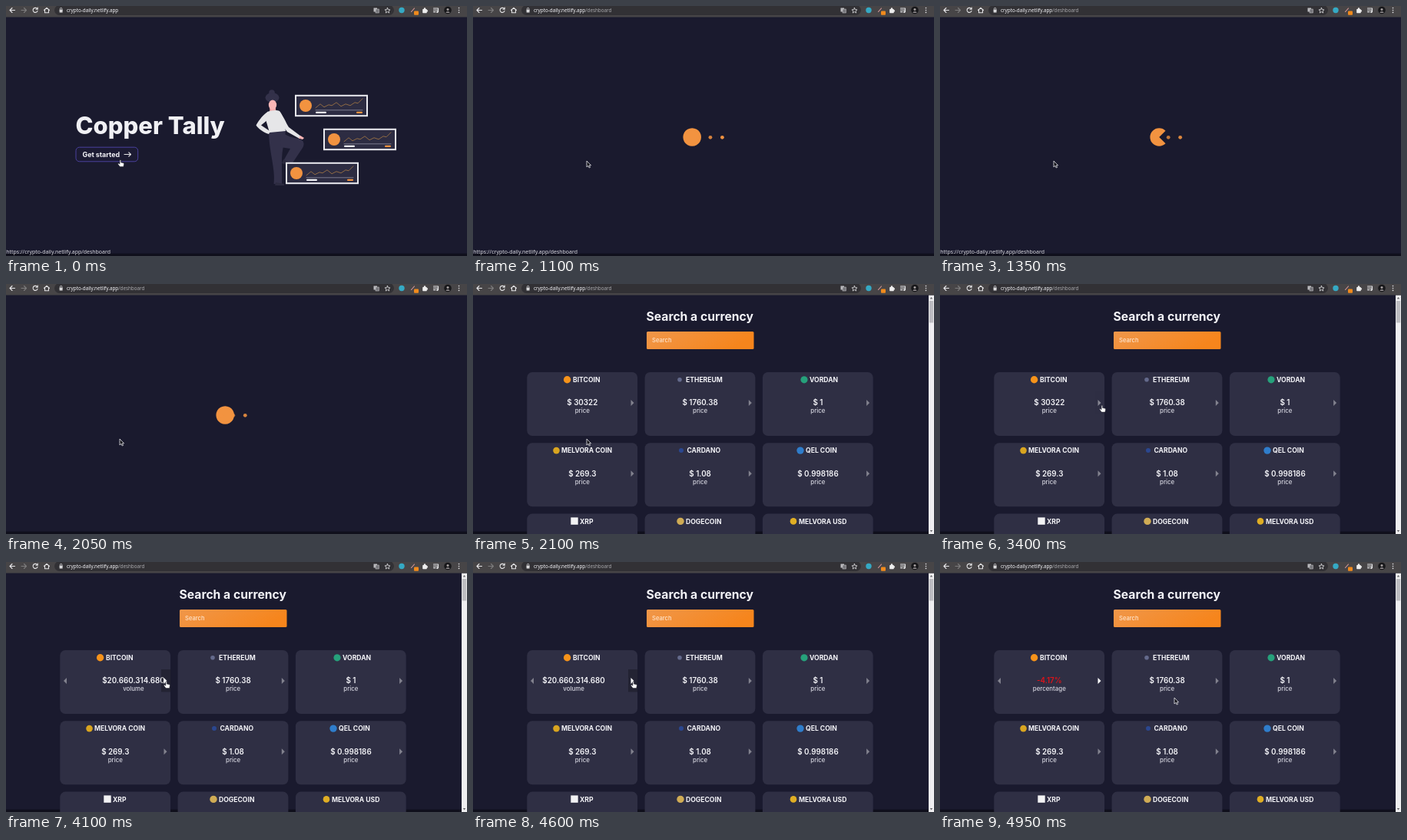
Animation of 600 by 326 pixels, one loop 5 s. Source, as an HTML page:

```html
<!DOCTYPE html>
<html lang="en">
<head>
<meta charset="utf-8">
<title>Currency dashboard</title>
<style>
  html, body { margin: 0; width: 100%; height: 100%; overflow: hidden; background: #1a1a2e; }
  svg { display: block; width: 600px; height: 326px; font-family: Inter, sans-serif; fill: #f4f4f8; }
  .bar { font: 500 6.3px "Noto Sans", sans-serif; }
  .status { font: 6.95px "Noto Sans", sans-serif; fill: #d9d9de; }
  .title { font-size: 31px; font-weight: 800; fill: #f0f0f4; }
  .head { font-size: 15.7px; font-weight: 700; }
  .cta { font-size: 8.9px; font-weight: 700; }
  .name { font-size: 8.6px; font-weight: 700; }
  .value { font-size: 9.8px; font-weight: 600; text-anchor: middle; }
  .label { font-size: 7.9px; font-weight: 500; fill: #d5d5df; text-anchor: middle; }
  .hint { font-size: 7.6px; font-weight: 500; fill: #ffe6cf; }
  .line { fill: none; stroke: #e4e4e6; stroke-width: 1.1; stroke-linecap: round; stroke-linejoin: round; }
</style>
</head>
<body>
<svg id="stage" viewBox="0 0 600 326"></svg>
<script>
const LOOP = 5000, STEP = 50;
const T = {
  load: 1100, statusOff: 1500, ready: 2100,
  hover: 3350, slide1: 3840, slide2: 4540, leave: 4700
};
const ORANGE = '#f29340', CARD = '#2f2f44', DARK = '#33314a', SHIRT = '#e6e6e8', SKIN = '#fbb6b6';
const SLIDE_W = 144, SLIDE_MS = 350;

const rect = (x, y, w, h, fill, extra = '') =>
  `<rect x="${x}" y="${y}" width="${w}" height="${h}" fill="${fill}" ${extra}/>`;
const dot = (x, y, r, fill) => `<circle cx="${x}" cy="${y}" r="${r}" fill="${fill}"/>`;
const oval = (x, y, rx, ry, fill) => `<ellipse cx="${x}" cy="${y}" rx="${rx}" ry="${ry}" fill="${fill}"/>`;
const text = (x, y, cls, str, extra = '') => `<text x="${x}" y="${y}" class="${cls}" ${extra}>${str}</text>`;
const path = (d, fill, extra = '') => `<path d="${d}" fill="${fill}" ${extra}/>`;
const line = (d, extra = '') => `<path d="${d}" class="line" ${extra}/>`;
const group = (id, body, extra = '') => `<g id="${id}" ${extra}>${body}</g>`;

function toolbar() {
  return rect(0, 0, 600, 14.5, '#474547') +
    rect(63, -1, 442, 13, '#323135', 'rx="6.5"') +
    line('M11.5 5.5H5M8 2.5L5 5.5L8 8.5') +
    line('M20 5.5H26.5M23.5 2.5L26.5 5.5L23.5 8.5', 'opacity=".35"') +
    line('M40.7 3.8A3 3 0 1 0 41 6.3M41.2 2V4.2H39') +
    line('M49.5 5.5L53 2.3L56.5 5.5M50.5 5V8.7H55.5V5') +
    rect(69.6, 4.8, 4, 3.6, '#d8d8da', 'rx=".5"') + line('M70.4 4.8V3.6A1.2 1.2 0 0 1 72.8 3.6V4.8', 'style="stroke-width:.8"') +
    text(79, 8, 'bar', 'crypto-daily.netlify.app<tspan id="route" fill="#a9a9ad" font-weight="400">/deshboard</tspan>') +
    rect(478.5, 2.5, 4.5, 5, '#b9b9bd') + rect(481, 4, 4.5, 5, '#77777c', 'stroke="#c9c9cc" stroke-width=".5"') +
    line('M496.5 2.4L497.5 4.7L500 4.9L498.1 6.5L498.7 9L496.5 7.6L494.3 9L494.9 6.5L493 4.9L495.5 4.7Z', 'style="stroke-width:.8"') +
    dot(515, 5.5, 3.7, '#35a9c4') +
    line('M527.5 7.5L531.5 3', 'style="stroke:#d99a9a"') + rect(531, 6.5, 6, 5.2, '#f08a1d', 'rx="1"') +
    rect(542.2, 4, 5.6, 5.2, '#eee', 'rx=".8"') + dot(545, 3.5, 1.2, '#eee') + dot(548, 6.4, 1.1, '#eee') +
    line('M556.5 3H562M556.5 5.3H562M556.5 7.6H559M562.5 3V7.5') + dot(561.4, 7.8, 1.2, '#e4e4e6') +
    dot(575, 5.5, 4.8, '#17171a') + dot(575, 4.4, 1.5, '#a6a0a0') + path('M572.3 9A2.8 2.8 0 0 1 577.7 9Z', '#8a8588') +
    [2.6, 5.5, 8.4].map(y => dot(589.5, y, .8, '#e4e4e6')).join('');
}

function quoteCard(x, y) {
  return `<g transform="translate(${x} ${y})">` +
    rect(1, 1, 93, 26.4, '#2d2c42', 'stroke="#ebebf0" stroke-width="2"') + dot(14, 14.2, 8, ORANGE) +
    line('M27 20H88', 'style="stroke:#8f8fa0;stroke-width:.8"') +
    line('M27 17L33 12L38 16L44 13L48 14L54 10L60 15L66 12L72 14L78 10L82 11L88 5',
      'style="stroke:#a97a45;stroke-width:.8"') +
    rect(27, 22, 14, 2.2, '#f1f1f4', 'rx="1.1"') + rect(80, 22, 8, 2.2, ORANGE, 'rx="1.1"') + '</g>';
}

function woman() {
  return dot(346, 113, 3.8, DARK) + oval(346.5, 119.5, 9, 6.5, DARK) +
    path('M343.5 131H350.5L352 141H343Z', '#f0a9a9') + oval(347, 129, 5.2, 6.4, SKIN) +
    // standing leg, raised leg, shoes
    path('M342 162H364L362 180C357 194 360 215 359 232H348.5C351 212 342 190 342 162Z', DARK) +
    path('M358 164C366 170 374 172 381 173C388 175 389 180 386 185L372 206L361 202L370 186L357 184Z', DARK) +
    path('M351 230L362 232V234H350Z', '#2c2b40') + path('M361 200L371 205L368 208L359 205Z', '#2c2b40') +
    // torso, arm on the hip, arm on the knee
    path('M340 138C345 136 352 135 356 137C361 142 362 153 364 163L343 165L338 148Z', SHIRT) +
    path('M341 138C336 140 329 149 325.5 155.5C329 161 336 165 342 167L344 163.5L332 155.5L341 148Z', SHIRT) +
    path('M355 138C361 142 364 152 368 158L384 170L382 173L366 164L357 152Z', SHIRT) +
    path('M383 169L388 172L386 174L381 172.5Z', SKIN);
}

function landing() {
  return text(90.5, 167, 'title', 'Copper Tally') +
    rect(91, 184.2, 80.7, 18.6, '#1c1b33', 'rx="4.5" stroke="#4a419e"') +
    text(99.5, 196.8, 'cta', 'Get started') + line('M154 193.5H162.5M159.8 190.8L162.5 193.5L159.8 196.2') +
    woman() + quoteCard(376, 115.8) + quoteCard(413, 159.8) + quoteCard(364, 203.8);
}

// name, name x, icon x, icon colour, icon radius, price
const COINS = [
  ['BITCOIN', 130, 122.6, '#f7931a', 4.7, ''],
  ['ETHEREUM', 277, 269, '#646a8c', 2.8, '$ 1760.38'],
  ['VORDAN', 438, 431, '#26a17b', 4.6, '$ 1'],
  ['MELVORA COIN', 115, 108.5, '#d9a520', 4.3, '$ 269.3'],
  ['CARDANO', 278.5, 271, '#2b478f', 3, '$ 1.08'],
  ['QEL COIN', 433, 426, '#2f7dcb', 4.7, '$ 0.998186'],
  ['XRP', 139, 132, '#f2f2f4', 4.7, ''],
  ['DOGECOIN', 277, 270, '#d0ac55', 4.7, ''],
  ['MELVORA USD', 424, 417, '#e0ae24', 4.3, '']
];

const next = (x, y) => path(`M${x - 2} ${y - 4}L${x + 2} ${y}L${x - 2} ${y + 4}Z`, '#fff');

function dashboard() {
  const cards = COINS.map(([name, nx, ix, color, r, price], i) => {
    const x = 70.3 + (i % 3) * 153.3, y = 115 + Math.floor(i / 3) * 92.3, mid = x + 72;
    const icon = name === 'XRP' ? rect(ix - r, y + 9.5 - r, r * 2, r * 2, color) : dot(ix, y + 9.8, r, color);
    const quote = price && text(mid, y + 43.3, 'value', price) + text(mid, y + 53.4, 'label', 'price') +
      `<g opacity=".4">${next(x + 137.2, y + 40)}</g>`;
    return rect(x, y, 143.8, 83, CARD, 'rx="7"') + icon + text(nx, y + 13, 'name', name) + quote;
  }).join('');
  const slides = [['$ 30322', 'price'], ['$20.660.314.680', 'volume'], ['-4.17%', 'percentage']]
    .map(([value, label], i) => {
      const x = 142.3 + i * SLIDE_W;
      return text(x, 158.3, 'value', value, i === 2 ? 'style="fill:#e01319"' : '') + text(x, 168.4, 'label', label);
    }).join('');
  return text(225.5, 48.3, 'head', 'Search a currency') +
    rect(226, 62, 139.5, 23, 'url(#warm)', 'rx="1.5"') + text(233, 76.3, 'hint', 'Search') +
    cards +
    `<g clip-path="url(#first)">${group('slides', slides)}</g>` +
    group('hoverBox', rect(202, 140, 12.1, 29.5, '#000', 'fill-opacity=".25"')) +
    group('next', next(207.5, 155)) +
    group('prev', path('M79 151L75 155L79 159Z', '#fff'), 'opacity=".4"') +
    rect(593, 14.5, 7, 311.5, '#efeff1') + rect(593.8, 22, 5.4, 28.5, '#bdbdc1') +
    path('M594.8 19.5L596.5 17L598.2 19.5Z', '#66666a') + path('M594.8 321L596.5 323.5L598.2 321Z', '#66666a');
}

const stage = document.getElementById('stage');
stage.innerHTML = `<defs>
    <linearGradient id="warm" x2="1" y2=".3"><stop stop-color="#f0974a"/><stop offset="1" stop-color="#f6851c"/></linearGradient>
    <clipPath id="first"><rect x="70.3" y="115" width="143.8" height="83"/></clipPath>
  </defs>` +
  rect(0, 0, 600, 326, '#1a1a2e') +
  rect(0, 322.7, 600, 3.3, '#10101c') +
  group('landing', landing()) +
  group('loader', path('', ORANGE, 'id="pac"') + [0, 1, 2].map(() => `<circle class="ball" cy="171.3" r="2.4" fill="${ORANGE}"/>`).join('')) +
  group('dashboard', dashboard()) +
  toolbar() +
  text(.3, 323, 'status', 'https://crypto-daily.netlify.app/deshboard', 'id="status"') +
  group('arrow', path('M0 0V8L1.9 6.3L3.2 9L4.5 8.4L3.3 5.8H5.6Z', '#15151c', 'stroke="#e8e8ec" stroke-width=".8"')) +
  group('hand', path('M-.9 .3C-.9 -.6 .6 -.6 .6 .3V3L3.7 3.7C4.4 4 4.6 4.5 4.5 5.2L3.9 8.6H-.7L-3.2 5.3C-3.4 4.4 -2.4 4 -1.8 4.6L-.9 5.3Z', '#fff', 'stroke="#22222c" stroke-width=".5"'));

const el = id => document.getElementById(id);
const balls = [...document.querySelectorAll('.ball')];
const show = (id, on) => el(id).style.display = on ? '' : 'none';
const clamp = v => Math.min(1, Math.max(0, v));
const smooth = v => v * v * (3 - 2 * v);
const easeOut = v => 1 - Math.pow(1 - v, 2.3);

// time, x, y of the pointer tip
const POINTER = [
  [0, 149, 201], [1099, 149, 201], [1100, 148, 202], [2700, 148, 202],
  [3250, 203, 178], [3300, 209, 165], [3400, 211, 158.5], [3600, 208.8, 156],
  [T.leave, 208.8, 156], [4900, 300, 174], [4950, 305, 177], [LOOP, 305, 177]
];

function pointerAt(t) {
  const i = POINTER.findIndex(k => k[0] > t);
  const [t0, x0, y0] = POINTER[i - 1], [t1, x1, y1] = POINTER[i];
  const p = (t - t0) / (t1 - t0);
  return [x0 + (x1 - x0) * p, y0 + (y1 - y0) * p];
}

function drawLoader(t) {
  const phase = (t % 500) / 250;
  const open = phase < 1 ? easeOut(phase) : 1 - easeOut(phase - 1);
  const a = Math.max(.01, 90 * open - 45) * Math.PI / 180;
  const dx = 11.8 * Math.cos(a), dy = 11.8 * Math.sin(a);
  el('pac').setAttribute('d', `M285.2 171L${285.2 + dx} ${171 + dy}A11.8 11.8 0 1 1 ${285.2 + dx} ${171 - dy}Z`);
  balls.forEach((ball, i) => {
    const p = (t / 1000 + i * .33) % 1;
    ball.setAttribute('cx', 324.4 - 46.9 * p);
    ball.setAttribute('opacity', p < .75 ? 1 - .4 * p : .7 + 1.2 * (p - .75));
  });
}

function draw(t) {
  const loading = t >= T.load && t < T.ready;
  show('landing', t < T.load);
  show('loader', loading);
  show('dashboard', t >= T.ready);
  show('route', t >= T.load);
  show('status', t < T.statusOff);
  if (loading) drawLoader(t - T.load);

  const slid = smooth(clamp((t - T.slide1) / SLIDE_MS)) + smooth(clamp((t - T.slide2) / SLIDE_MS));
  el('slides').setAttribute('transform', `translate(${-SLIDE_W * slid} 0)`);
  const over = clamp((t - T.hover) / 250) ** 2;
  el('hoverBox').setAttribute('opacity', over * (1 - clamp((t - T.leave) / 200)));
  el('next').setAttribute('opacity', .4 + .6 * over);
  show('prev', t >= T.slide1);

  const hand = t < T.load || (t >= 3300 && t <= T.leave);
  show('hand', hand);
  show('arrow', !hand);
  el(hand ? 'hand' : 'arrow').setAttribute('transform', `translate(${pointerAt(t)})`);
}

function tick() {
  draw(Math.floor(performance.now() % LOOP / STEP) * STEP);
  requestAnimationFrame(tick);
}
tick();
</script>
</body>
</html>
```
